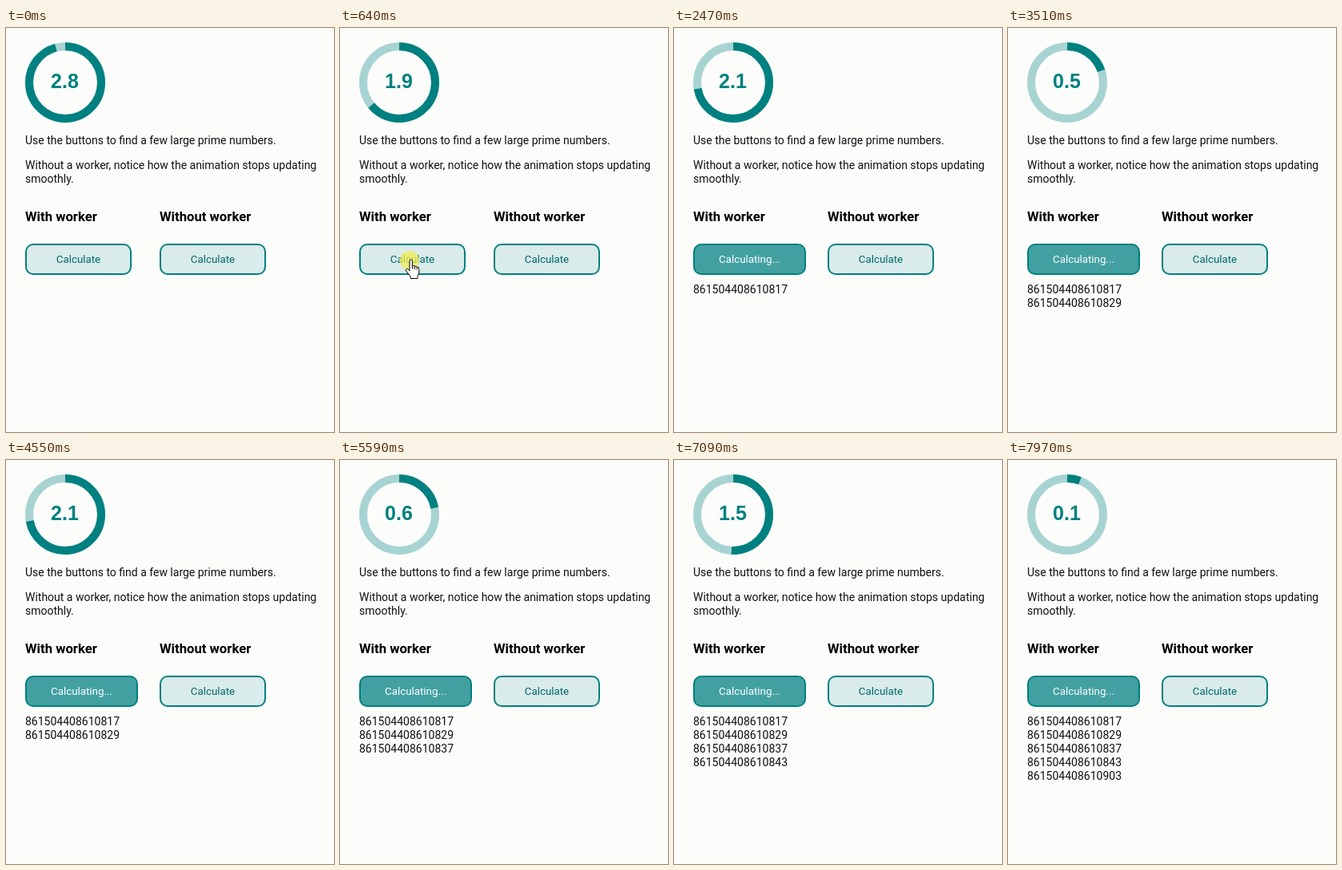
Animation of 410x504 px, one loop 7990 ms. Source, as an HTML page:

```html
<!DOCTYPE html>
<html lang="en">
<head>
<meta charset="utf-8">
<title>Prime numbers with a worker</title>
<style>
  html, body { margin: 0; width: 100%; height: 100%; overflow: hidden; background: #fcfdfb; }
  svg { display: block; width: 410px; height: 504px; font: 14px Roboto, sans-serif; fill: #111; }
  h3, .title { font-size: 16.7px; font-weight: 700; fill: #000; }
  .ring { fill: none; stroke-width: 10; }
  .value { font: 700 25px "Liberation Sans", Arial, sans-serif; fill: #008080; text-anchor: middle; }
  .button rect { fill: #d9ebea; stroke: #008080; stroke-width: 2; }
  .button text { font-size: 13.333px; fill: #00696b; text-anchor: middle; }
  .button.busy rect { fill: #43a0a0; }
  .button.busy text { fill: #fff; }
  .cursor path { fill: #fff; stroke: #000; stroke-linejoin: round; }
</style>
</head>
<body>
<svg viewBox="0 0 410 504">
  <circle class="ring" cx="74" cy="68" r="45" stroke="#a8d3d3"/>
  <circle class="ring" id="arc" cx="74" cy="68" r="45" stroke="#008080" pathLength="360" transform="rotate(-90 74 68)"/>
  <text class="value" id="value" x="73.5" y="75"></text>

  <text x="24" y="145">Use the buttons to find a few large prime numbers.</text>
  <text x="24" y="176">Without a worker, notice how the animation stops updating</text>
  <text x="24" y="193">smoothly.</text>

  <text class="title" x="24" y="241">With worker</text>
  <text class="title" x="192" y="241">Without worker</text>

  <g class="button" id="button">
    <rect x="25" y="270" width="131" height="37" rx="9"/>
    <text x="90.5" y="293">Calculate</text>
  </g>
  <g class="button">
    <rect x="193" y="270" width="131" height="37" rx="9"/>
    <text x="258.5" y="293">Calculate</text>
  </g>

  <g id="primes"></g>

  <g class="cursor" id="cursor">
    <circle cx="-2" cy="1" r="12" fill="#f0ee50" fill-opacity=".75"/>
    <path id="arrow" d="M0 0V16L3.7 12.6L6.2 18.5L8.8 17.4L6.3 11.6H11.3Z"/>
    <path id="hand" d="M-2 1.5Q-2 0 -.3 0T1.4 1.5V7.5Q3 6.6 4.4 8.2Q6.2 7.6 7.2 9.2Q9.8 8.8 9.8 11.5V16Q9.8 18 8 20.5V23.5H-.8V21L-6 14.5Q-7.5 12.3 -6 11.6T-3.5 12.5L-2 14Z M1.4 7.5V11.5M4.4 8.2V12M7.2 9.2V12.5"/>
  </g>
</svg>
<script>
  const LOOP = 7990, CLICK = 770;
  const $ = id => document.getElementById(id);

  // [time in ms, unwrapped arc angle in degrees]
  const arcKeys = [
    [100, 328.5], [640, 230.8], [1470, 82], [3510, -288.8], [4110, -384],
    [5590, -640.4], [7090, -897], [7970, -1059]
  ];
  // [time in ms, x, y] of the pointer tip
  const cursorKeys = [
    [100, 177, 449], [280, 128, 368], [440, 100, 310], [580, 89, 289],
    [900, 89, 289], [1050, 150, 316], [1200, 275, 362], [1360, 425, 400]
  ];
  const primes = [
    [1950, 817], [3430, 829], [4930, 837], [6420, 843], [7900, 903]
  ];

  function sample(keys, t) {
    let i = 1;
    while (i < keys.length - 1 && t > keys[i][0]) i++;
    const a = keys[i - 1], b = keys[i];
    const k = (t - a[0]) / (b[0] - a[0]);
    return a.slice(1).map((v, j) => v + (b[j + 1] - v) * k);
  }

  const show = (el, on) => el.setAttribute('visibility', on ? 'visible' : 'hidden');

  const lines = primes.map(([, tail], i) => {
    const text = document.createElementNS('http://www.w3.org/2000/svg', 'text');
    text.setAttribute('x', 24);
    text.setAttribute('y', 331 + 17 * i);
    text.textContent = '861504408610' + tail;
    $('primes').append(text);
    return text;
  });

  function draw(t) {
    const angle = t < 100 ? 344.9 : (sample(arcKeys, t)[0] + 1440) % 360;
    $('arc').setAttribute('stroke-dasharray', `${angle} 400`);
    $('value').textContent = (Math.floor(angle / 12) / 10).toFixed(1);

    const busy = t >= CLICK;
    const [rect, label] = $('button').children;
    $('button').classList.toggle('busy', busy);
    rect.setAttribute('width', busy ? 139 : 131);
    label.setAttribute('x', busy ? 94.5 : 90.5);
    label.textContent = busy ? 'Calculating...' : 'Calculate';

    lines.forEach((line, i) => show(line, t >= primes[i][0]));

    const visible = t >= 100 && t < 1360;
    const [x, y] = sample(cursorKeys, t);
    const hovering = !busy && x < 157 && y > 269 && y < 308;
    $('cursor').setAttribute('transform', `translate(${x} ${y})`);
    $('cursor').style.display = visible ? '' : 'none';
    show($('hand'), hovering);
    show($('arrow'), !hovering);
  }

  const start = performance.now();
  function tick() {
    draw((performance.now() - start) % LOOP);
    requestAnimationFrame(tick);
  }
  draw(0);
  requestAnimationFrame(tick);
</script>
</body>
</html>
```
